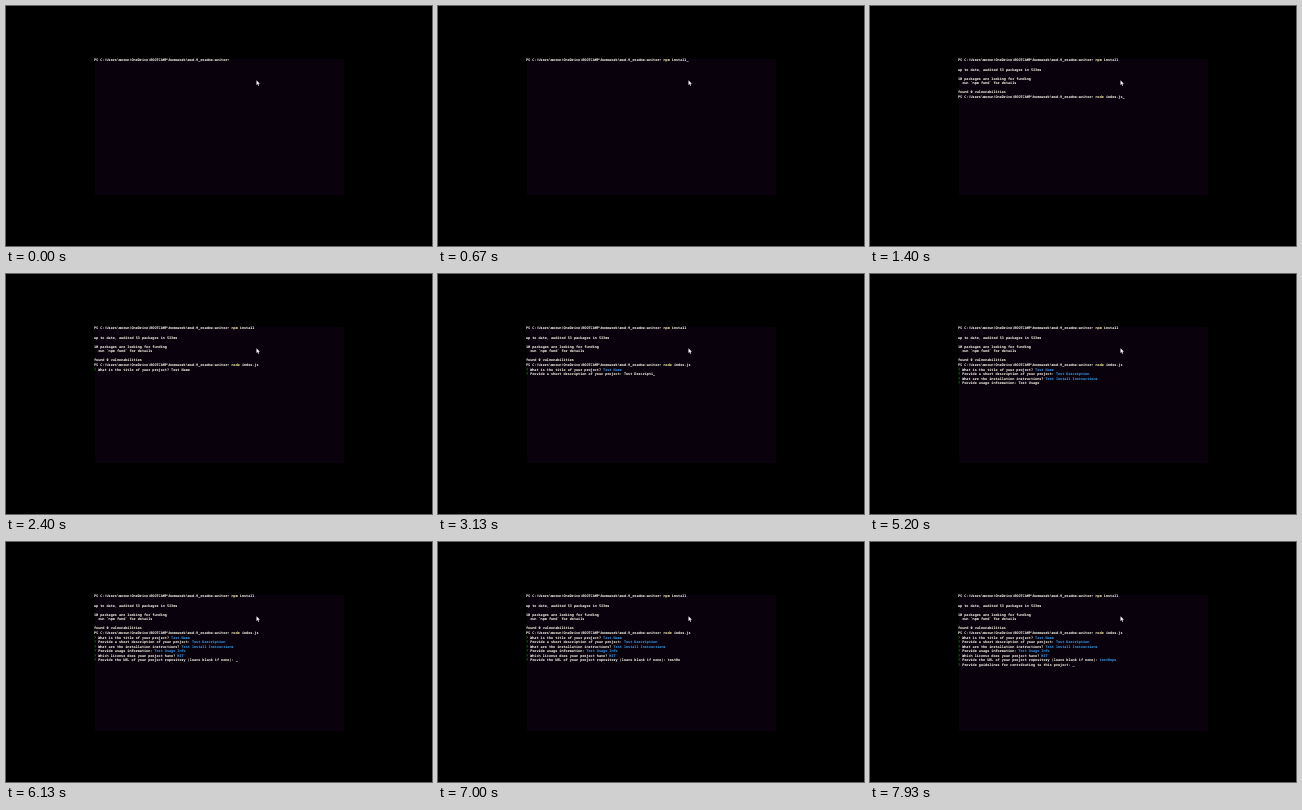
An HTML page that plays this animation: 426 px wide and 240 px high, repeating every 8 s.

```html
<!DOCTYPE html>
<html lang="en">
<head>
<meta charset="utf-8">
<title>Readme writer in a terminal</title>
<style>
  html, body { margin: 0; width: 100%; height: 100%; overflow: hidden; background: #000; }
  #stage { position: absolute; left: 0; top: 0; width: 426px; height: 240px; overflow: hidden; background: #000; }
  #window { position: absolute; left: 88px; top: 52px; width: 250px; height: 137px; }
  #window::before { content: ""; position: absolute; inset: 1px 0 0 1px; background: #09020d; }
  /* 120 x 30 cells of 12 x 26.3, scaled down to the window */
  #screen {
    position: absolute; left: 0; top: -.4px; margin: 0; width: 1440px; height: 789px;
    transform: scale(.17361); transform-origin: 0 0; white-space: pre;
    font: 600 20px/26.3px "Noto Sans Mono", "Liberation Mono", monospace;
    text-rendering: geometricPrecision; color: #fffff0;
  }
  .command { color: #fff9b0; }
  .mark { color: #13a10e; }
  .answer { color: #3aa0f0; }
  #pointer { position: absolute; left: 250px; top: 73.5px; }
</style>
</head>
<body>
<div id="stage">
  <div id="window"><pre id="screen"></pre></div>
  <svg id="pointer" width="5" height="7" viewBox="0 0 5 7">
    <path d="M.5 .2V4.9L1.5 4L2.3 5.8L3.1 5.4L2.3 3.7H3.8Z" fill="#fff"/>
  </svg>
</div>
<script>
  const LOOP = 8000, BLINK = 600;
  const screen = document.getElementById('screen');
  const path = String.raw`PS C:\Users\merun\OneDrive\BOOTCAMP\homework\mod-9_readme-writer> `;
  const report = [
    '', 'up to date, audited 53 packages in 533ms',
    '', '10 packages are looking for funding', '  run `npm fund` for details',
    '', 'found 0 vulnerabilities', ''
  ].join('\n');

  // show: line appears, from/to: typing span, enter: line is accepted
  const commands = [
    { show: 0, text: 'npm install', from: 100, to: 600, enter: 730, output: report },
    { show: 730, text: 'node index.js', from: 830, to: 1380, enter: 1530, output: '' }
  ];
  const questions = [
    { show: 1600, ask: 'What is the title of your project?', text: 'Test Name', from: 1800, to: 2330, enter: 2470 },
    { show: 2470, ask: 'Provide a short description of your project:', text: 'Test Description', from: 2530, to: 3200, enter: 3330 },
    { show: 3330, ask: 'What are the installation instructions?', text: 'Test Install Instructions', from: 3430, to: 4530, enter: 4670 },
    { show: 4670, ask: 'Provide usage information:', text: 'Test Usage Info', from: 4730, to: 5330, enter: 5470 },
    { show: 5470, ask: 'Which license does your project have?', text: 'MIT', from: 5600, to: 5800, enter: 5930 },
    { show: 5930, ask: 'Provide the URL of your project repository (leave blank if none):', text: 'testRepo', from: 6530, to: 7070, enter: 7270 },
    { show: 7270, ask: 'Provide guidelines for contributing to this project:', text: '', from: 8000, to: 8001, enter: 8001 }
  ];

  const span = (name, text) => `<span class="${name}">${text}</span>`;

  function typed({ text, from, to }, t) {
    const part = Math.min(1, Math.max(0, (t - from) / (to - from)));
    return text.slice(0, Math.floor(part * text.length + 1e-6));
  }

  function render(t) {
    const phase = t % BLINK;
    const caret = phase >= 70 && phase < 370 ? '_' : '';
    let out = '';
    for (const c of commands) {
      if (t < c.show) break;
      const entry = typed(c, t);
      const [word, ...rest] = entry.split(' ');
      out += path + span('command', word) + (rest.length ? ' ' + rest.join(' ') : '');
      out += t < c.enter ? caret : '\n' + c.output;
    }
    for (const q of questions) {
      if (t < q.show) break;
      const done = t >= q.enter;
      const entry = typed(q, t);
      out += span('mark', '?') + ' ' + q.ask + ' ';
      out += done ? span('answer', entry) + '\n' : entry + caret;
    }
    return out;
  }

  let last = null;
  const start = performance.now();
  function frame(now) {
    const html = render(Math.max(0, now - start) % LOOP);
    if (html !== last) screen.innerHTML = last = html;
    requestAnimationFrame(frame);
  }
  frame(start);
</script>
</body>
</html>
```
